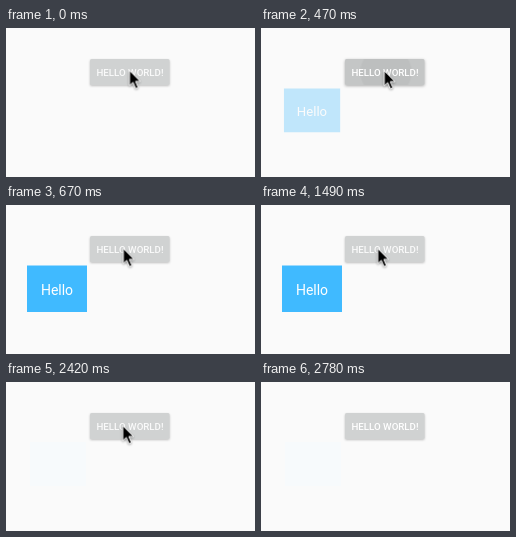
Recreate the animation shown at these times as an HTML page. Size 249 by 149 pixels, loop 4.05 s.

```html
<!DOCTYPE html>
<html lang="en">
<head>
<meta charset="utf-8">
<title>Hello popup</title>
<style>
  html, body { margin: 0; width: 100%; height: 100%; overflow: hidden; background: #fafafa; }
  svg { display: block; width: 249px; height: 149px; font-family: Roboto, sans-serif; }
  text { fill: #fff; text-anchor: middle; }
  .face, .wash, .ripple, .label, .popup, .ghost, .cursor { animation: 4050ms linear infinite; }

  .face { fill: #d0d2d2; animation-name: lift; }
  .wash { fill: #000; animation-name: wash; }
  .ripple { fill: #000; transform-origin: 125px 44px; animation-name: ripple; }
  .label { font-size: 9.7px; font-weight: 500; animation-name: label; }
  .popup { transform-origin: 51px 60.5px; animation-name: popup; }
  .popup rect { fill: #40baff; }
  .popup text { font-size: 14px; }
  .ghost { fill: #f7fafc; animation-name: ghost; }
  .cursor { animation-name: move; }

  /* raised shadow deepens while the button is held */
  @keyframes lift {
    0%, 2.96% { filter: drop-shadow(0 1px 1px rgba(0,0,0,.24)); }
    3.704%, 13.827% { filter: drop-shadow(0 1.6px 1.6px rgba(0,0,0,.32)); }
    16.543%, 100% { filter: drop-shadow(0 1px 1px rgba(0,0,0,.24)); }
  }
  @keyframes wash {
    0%, 10.86% { opacity: 0; }
    10.864%, 12.4% { opacity: .055; }
    13.827% { opacity: .035; }
    16.543%, 100% { opacity: 0; }
  }
  @keyframes ripple {
    0%, 10.86% { opacity: 0; transform: scale(.42); }
    10.864% { opacity: .04; transform: scale(.42); }
    13.827% { opacity: .02; transform: scale(1); }
    16.543%, 100% { opacity: 0; transform: scale(1); }
  }
  @keyframes label {
    0%, 10.86% { opacity: .9; }
    10.864%, 12.4% { opacity: 1; }
    13.827%, 68.63% { opacity: .9; }
    68.642%, 100% { opacity: 1; }
  }
  @keyframes popup {
    0%, 11.6% { opacity: 0; transform: scale(.92); }
    11.605% { opacity: .3; transform: scale(.94); animation-timing-function: ease-out; }
    13.827%, 47.89% { opacity: 1; transform: none; }
    47.901% { opacity: .48; transform: scale(.945); }
    49.383%, 100% { opacity: 0; transform: scale(.93); }
  }
  @keyframes ghost {
    0%, 49.37% { opacity: 0; }
    49.383%, 100% { opacity: 1; }
  }
  @keyframes move {
    0%, 10.864% { transform: translate(123.5px, 42.5px); }
    13.827% { transform: translate(122.3px, 43.3px); }
    16.543%, 36.78% { transform: translate(117.3px, 43.5px); }
    36.79%, 59.753% { transform: translate(116.7px, 43.5px); animation-timing-function: cubic-bezier(.45, .1, .75, .8); }
    68.642%, 100% { transform: translate(187px, 153px); }
  }
</style>
</head>
<body>
<svg viewBox="0 0 249 149">
  <defs>
    <clipPath id="edge"><rect x="84" y="31" width="79.5" height="26" rx="1.5"/></clipPath>
  </defs>
  <rect width="249" height="149" fill="#fafafa"/>
  <rect class="ghost" x="24" y="60" width="56" height="44"/>

  <rect class="face" x="84" y="31" width="79.5" height="26" rx="1.5"/>
  <g clip-path="url(#edge)">
    <rect class="wash" x="84" y="31" width="79.5" height="26"/>
    <circle class="ripple" cx="125" cy="44" r="45"/>
  </g>
  <text class="label" x="124" y="47.6">HELLO WORLD!</text>

  <g class="popup">
    <rect x="21" y="60.5" width="60" height="46.5"/>
    <text x="51" y="89.6">Hello</text>
  </g>

  <g class="cursor">
    <path d="M0 0V15.2L3.5 11.9 6.2 18 8.7 16.9 6.1 10.9H10.8Z" fill="#000" stroke="#fff" stroke-width="1"
      style="filter: drop-shadow(0 1px .8px rgba(0,0,0,.35))"/>
  </g>
</svg>
</body>
</html>
```
